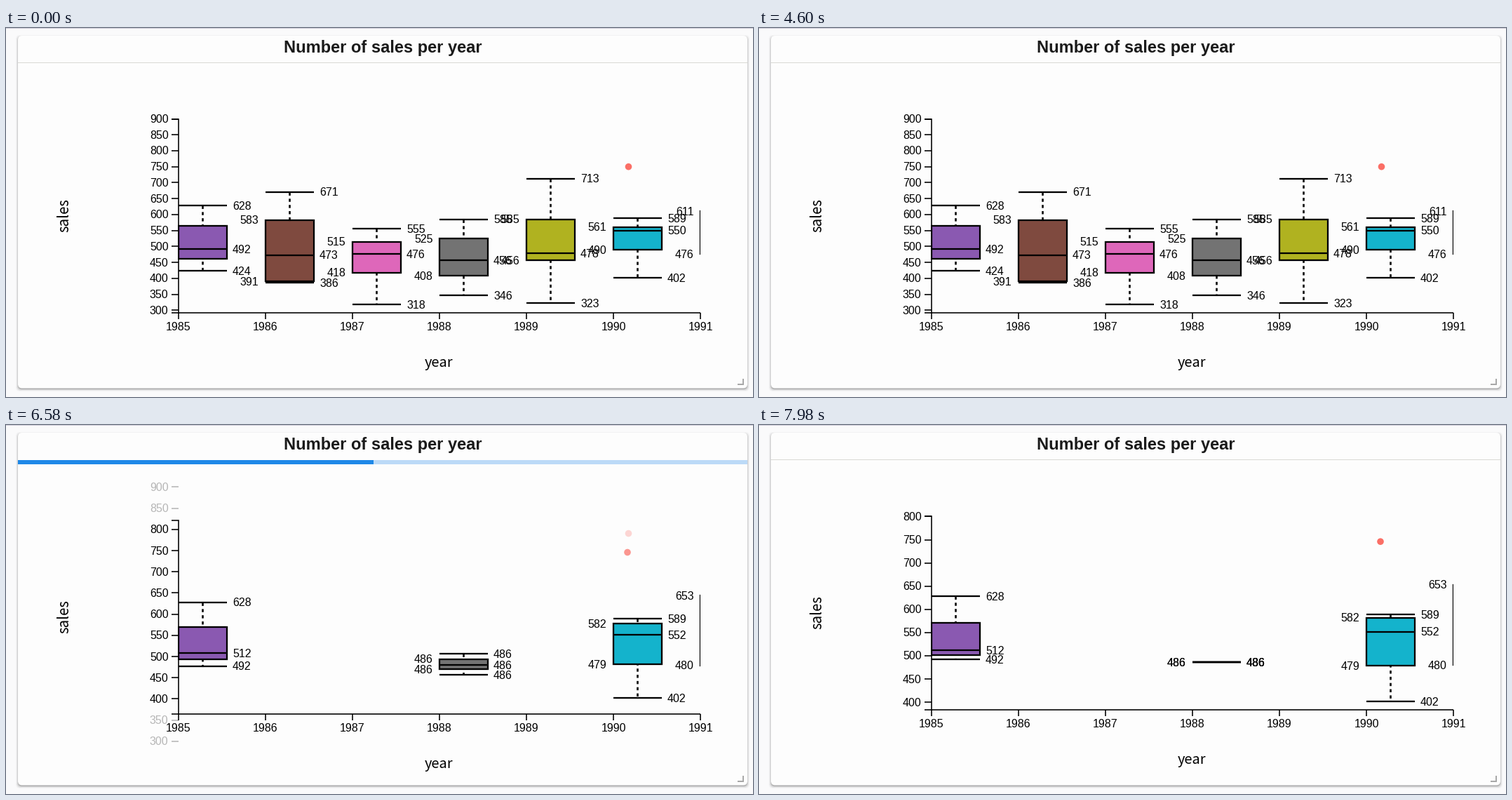
A matplotlib script for the animation above (8 s loop, 1065 by 526 pixels).

```python
import numpy as np
import matplotlib.pyplot as plt
from matplotlib.animation import FuncAnimation
from matplotlib.lines import Line2D
from matplotlib.patches import Circle, FancyBboxPatch, Rectangle
from matplotlib.transforms import Affine2D, Bbox, TransformedBbox

W, H, DPI = 1065, 526, 100
STEP, FRAMES = 40, 200
LEFT, RIGHT, TOP, BASE, YEAR = 246, 990, 129.5, 405.5, 124
CARD_X, CARD_W = 17, 1040
LOAD_ON, LOAD_OFF = 5740, 7400

# year: colour, then (low, q1, median, q3, high) before and after the update
BOXES = {
    1985: ("#8a59b1", (424, 461, 492, 565, 628), (492, 502, 512, 571, 628)),
    1986: ("#7f4a3f", (386, 391, 473, 583, 671), None),
    1987: ("#de67ba", (318, 418, 476, 515, 555), None),
    1988: ("#737373", (346, 408, 456, 525, 585), (486,) * 5),
    1989: ("#b0b220", (323, 456, 478, 585, 713), None),
    1990: ("#14b3cc", (402, 490, 550, 561, 589), (402, 479, 552, 582, 589)),
    1991: ("#e07b1c", (440, 476, 540, 611, 700), (440, 480, 560, 653, 700)),
}


def pt(px):
    return px * 72 / DPI


def old_y(v):
    return TOP + (900 - v) * 0.4548


def new_y(v):
    return 130.4 + (800 - v) * 0.662


def lerp(a, b, p):
    return a + (b - a) * p


def cubic_in_out(t):
    t = min(max(t, 0), 1)
    return 4 * t**3 if t < 0.5 else 1 - 4 * (1 - t) ** 3


S = np.linspace(0, 1, 300)
EASE_X = 0.75 * S * (1 - S) ** 2 + 0.75 * S**2 * (1 - S) + S**3
EASE_Y = 0.3 * S * (1 - S) ** 2 + 3 * S**2 * (1 - S) + S**3


def css_ease(t):
    return np.interp(t, EASE_X, EASE_Y)


def clock(t):
    """Transition time in ms; it runs unevenly against the loop time."""
    return np.interp(t, [LOAD_ON, 6180, 6580, 7180, LOAD_OFF],
                     [60, 137, 441, 661, 750])


fig = plt.figure(figsize=(W / DPI, H / DPI), dpi=DPI, facecolor="#fafafb")
ax = fig.add_axes([0, 0, 1, 1])
ax.set_xlim(0, W)
ax.set_ylim(H, 0)
ax.axis("off")

shift = Affine2D()
chart = shift + ax.transData
clip = TransformedBbox(Bbox.from_extents(LEFT - 1, 0, RIGHT, H), ax.transData)


def line(xs, ys, width, z=3, clipped=False, **kw):
    item = Line2D(xs, ys, lw=pt(width), color="black", zorder=z, transform=chart,
                  solid_capstyle="butt", solid_joinstyle="miter", **kw)
    ax.add_line(item)
    if clipped:
        item.set_clip_box(clip)
    return item


def label(x, y, s, ha="center", size=16, moves=True, **kw):
    style = dict(family="Liberation Sans", color="black", va="baseline", zorder=6)
    style.update(kw)
    return ax.text(x, y, s, ha=ha, fontsize=pt(size),
                   transform=chart if moves else ax.transData, **style)


def rect(x, y, w, h, color, z):
    return ax.add_patch(Rectangle((x, y), w, h, fc=color, ec="none", lw=0, zorder=z))


def draw_card():
    rect(0, 0, W, 1, "#cfccd9", 0)
    for grow, drop, alpha in ((3, 2, 0.03), (2, 2, 0.05), (1, 2, 0.09), (0, 2, 0.16)):
        ax.add_patch(FancyBboxPatch(
            (CARD_X - grow, 11 - grow + drop), CARD_W + 2 * grow, 502 + 2 * grow,
            boxstyle="round,pad=0,rounding_size=6", fc="black", ec="none",
            lw=0, alpha=alpha, zorder=0.5))
    ax.add_patch(FancyBboxPatch(
        (CARD_X, 11), CARD_W, 502.5, boxstyle="round,pad=0,rounding_size=6",
        fc="#fdfdfd", ec="none", lw=0, zorder=1))
    label(537, 35, "Number of sales per year", size=23.6, moves=False,
          weight="bold", color="#1a1a1a")
    rect(1049.5, 500, 2.5, 9, "#a8a8a8", 2)
    rect(1043, 506.5, 9, 2.5, "#a8a8a8", 2)


def draw_axes():
    line([LEFT - 10, LEFT, LEFT, LEFT - 10], [TOP, TOP, BASE, BASE], 1.6)
    line([LEFT, RIGHT], [BASE, BASE], 1.6)
    for year in range(1985, 1992):
        x = LEFT + (year - 1985) * YEAR
        line([x, x], [BASE, BASE + 9], 1.6)
        label(x, 430.7, str(year))
    label(617, 483, "year", size=20, family="Noto Sans CJK JP")
    label(89, 267, "sales", size=20.5, family="Noto Sans CJK JP",
          rotation=90, rotation_mode="anchor")


class Tick:
    def __init__(self, value):
        self.value = value
        self.mark = line([LEFT - 10, LEFT], [0, 0], 1.6)
        self.text = label(231.5, 0, str(value), "right")

    def update(self, p):
        y = lerp(old_y(self.value), new_y(self.value), p)
        self.mark.set_ydata([y, y])
        self.text.set_y(y + 5.5)
        alpha = 1 if 400 <= self.value <= 800 else 1 - p
        self.mark.set_alpha(alpha)
        self.text.set_alpha(alpha)


class Box:
    def __init__(self, year, color, before, after):
        self.before, self.after = before, after
        x = LEFT + (year - 1985) * YEAR
        end, mid = x + 68.5, x + 34
        self.stem = line([mid, mid], [0, 0], 2.6, 3.5, True, ls=(0, (1.7, 1.7)))
        self.body = Rectangle((x, 0), 68.5, 0, fc=color, ec="black", lw=pt(2.3),
                              zorder=4, transform=chart, joinstyle="miter")
        ax.add_patch(self.body)
        self.body.set_clip_box(clip)
        self.bars = {k: line([x, end], [0, 0], 2.3, 5, True) for k in (0, 2, 4)}
        self.texts = {}
        if year < 1991:
            for k in (0, 2, 4):
                self.texts[k] = label(end + 8.5, 0, "", "left")
        if year > 1985:
            for k in (1, 3):
                self.texts[k] = label(x - 9.5, 0, "", "right")
        self.parts = [self.stem, self.body, *self.bars.values(), *self.texts.values()]

    def update(self, p, changed):
        shown = not changed or self.after is not None
        for part in self.parts:
            part.set_visible(shown)
        if not shown:
            return
        values = self.after if changed else self.before
        ys = [old_y(v) for v in self.before]
        if changed:
            ys = [lerp(y, new_y(v), p) for y, v in zip(ys, values)]
        self.stem.set_ydata([ys[4], ys[0]])
        self.body.set_y(ys[3])
        self.body.set_height(ys[1] - ys[3])
        for k, bar in self.bars.items():
            bar.set_ydata([ys[k], ys[k]])
        for k, text in self.texts.items():
            text.set_text(str(values[k]))
            text.set_y(ys[k] + 5.7)


def dot(x):
    return ax.add_patch(Circle((x, 0), 4.8, fc="#fb6f66", ec="none", lw=0,
                               zorder=5, transform=chart))


draw_card()
draw_axes()
rule = rect(CARD_X, 48.7, CARD_W, 1.4, "#d9d9d4", 2)
track = rect(CARD_X, 49.5, CARD_W, 6.5, "#bcdaf7", 2)
runner = rect(CARD_X, 50, 0, 6, "#1e88e8", 2.5)
ticks = [Tick(v) for v in range(300, 901, 50)]
boxes = [Box(year, *spec) for year, spec in BOXES.items()]
old_dot, new_dot = dot(887.5), dot(886)


def update(i):
    t = i * STEP + STEP / 2
    changed = t >= LOAD_ON
    loading = changed and t < LOAD_OFF
    now = clock(t)
    p = cubic_in_out(now / 750) if changed else 0

    shift.clear().translate(0, 6 if loading else 0)
    rule.set_visible(not loading)
    track.set_visible(loading)
    runner.set_visible(loading)
    q = css_ease(max(0, now - 85) / 1320)
    start, stop = np.clip([-2 + 3.07 * q, 1.08 * q], 0, 1) * CARD_W
    runner.set_x(CARD_X + start)
    runner.set_width(stop - start)

    for tick in ticks:
        tick.update(p)
    for box in boxes:
        box.update(p, changed)
    old_dot.center = (887.5, lerp(old_y(750), TOP, p))
    old_dot.set_alpha(1 - p)
    new_dot.center = (886, lerp(old_y(746), new_y(746), p))
    new_dot.set_alpha(p)
    return []


anim = FuncAnimation(fig, update, frames=FRAMES, interval=STEP, repeat=True,
                     repeat_delay=0, init_func=lambda: update(0), blit=False)
plt.show()
```
